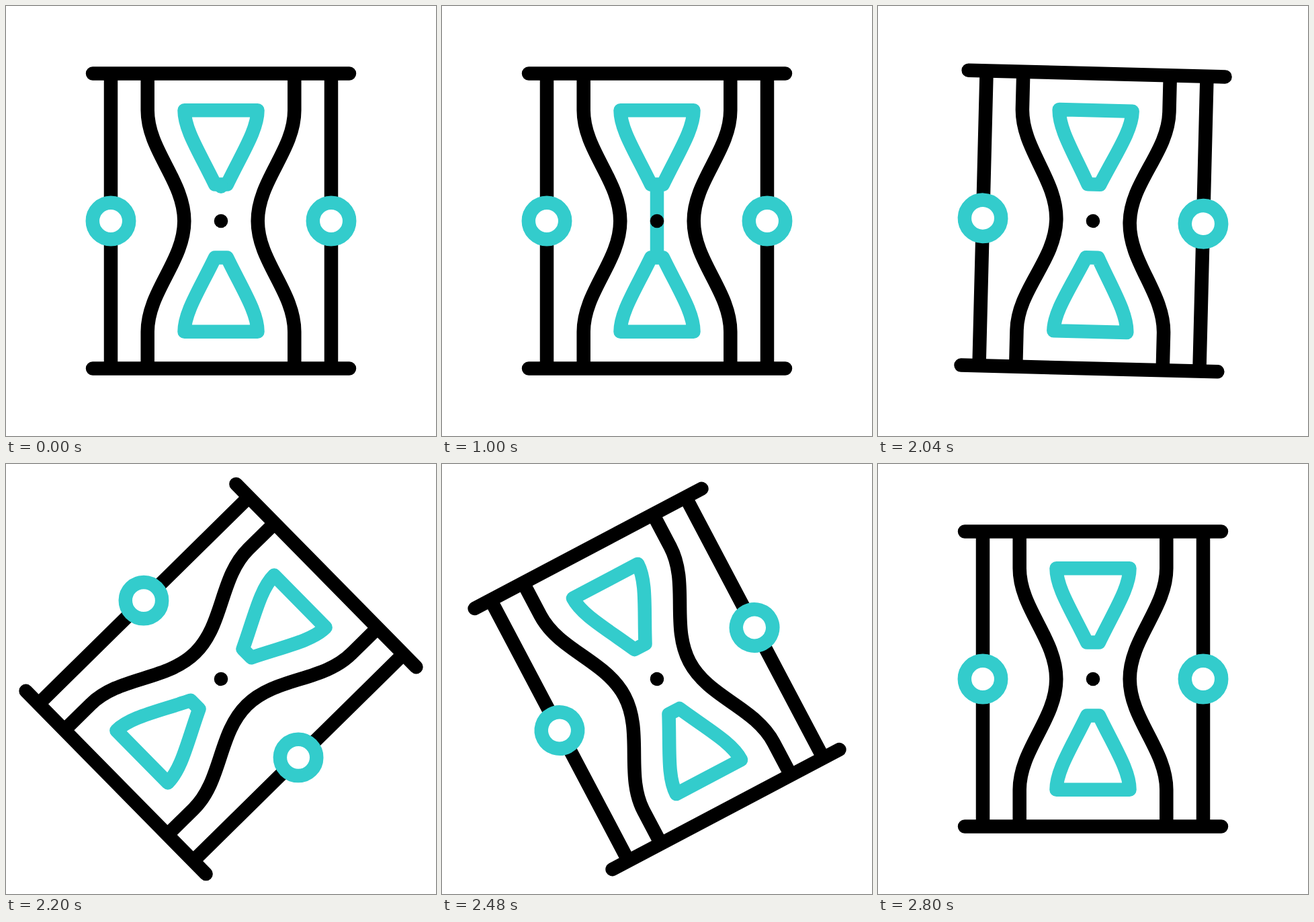
An HTML page that plays this animation: 640 px wide and 640 px high, repeating every 3000 ms.

```html
<!DOCTYPE html>
<html lang="en">
<head>
<meta charset="utf-8">
<title>Hourglass</title>
<style>
  html, body { margin: 0; height: 100%; overflow: hidden; background: #fff; }
  svg { display: block; width: 100%; height: 100%; }
  .ink, .teal { fill: none; stroke: #000; stroke-width: 20.5; stroke-linejoin: round; }
  .teal { stroke: #3cc; }
  .round { stroke-linecap: round; }
</style>
</head>
<body>
<svg viewBox="0 0 640 640">
  <defs>
    <path id="sand" d="M265.5 155.3H374.5C374.5 184 352 218 329 265.5H311C288 218 265.5 184 265.5 155.3Z"/>
    <path id="glass" d="M210.7 100.5V155.2C210.7 215 265.3 260 265.3 320S210.7 425 210.7 484.8V539.5"/>
  </defs>
  <g id="hourglass">
    <g class="ink">
      <path d="M156 100.5V539.5M484 100.5V539.5"/>
      <use href="#glass"/>
      <use href="#glass" transform="matrix(-1 0 0 1 640 0)"/>
      <path class="round" d="M129 100.5H511M129 539.5H511"/>
    </g>
    <g class="teal">
      <g fill="#fff">
        <circle cx="156" cy="320" r="27.2"/>
        <circle cx="484" cy="320" r="27.2"/>
      </g>
      <use href="#sand"/>
      <use href="#sand" transform="matrix(1 0 0 -1 0 640)"/>
      <path id="stream" class="round"/>
    </g>
    <circle cx="320" cy="320" r="10.3"/>
  </g>
</svg>
<script>
  const LOOP = 3000, STEP = 40;
  const TOP = 268.7, BOTTOM = 374;
  const hourglass = document.getElementById('hourglass');
  const stream = document.getElementById('stream');

  // Progress along cubic-bezier(x1, 0, x2, 1) between two times
  function ease(time, start, end, x1, x2) {
    const u = Math.min(1, Math.max(0, (time - start) / (end - start)));
    let low = 0, high = 1, s = 0.5;
    for (let i = 0; i < 24; i++) {
      s = (low + high) / 2;
      const x = 3 * s * (1 - s) * ((1 - s) * x1 + s * x2) + s ** 3;
      if (x < u) low = s; else high = s;
    }
    return s * s * (3 - 2 * s);
  }

  function draw(now) {
    const time = Math.floor(now % LOOP / STEP) * STEP;
    const streamY = progress => TOP + (BOTTOM - TOP) * progress;
    const head = streamY(ease(time, 0, 600, 0.33, 0.67));
    const tail = streamY(ease(time, 1280, 1760, 0.33, 0.67));
    stream.setAttribute('d', time < 1760 ? `M320 ${tail}V${head}` : '');

    const angle = 180 * ease(time, 2000, 2800, 0.333, 0.307);
    hourglass.setAttribute('transform', `rotate(${angle} 320 320)`);
  }

  const begin = performance.now();
  function tick() {
    draw(performance.now() - begin);
    requestAnimationFrame(tick);
  }
  tick();
</script>
</body>
</html>
```
